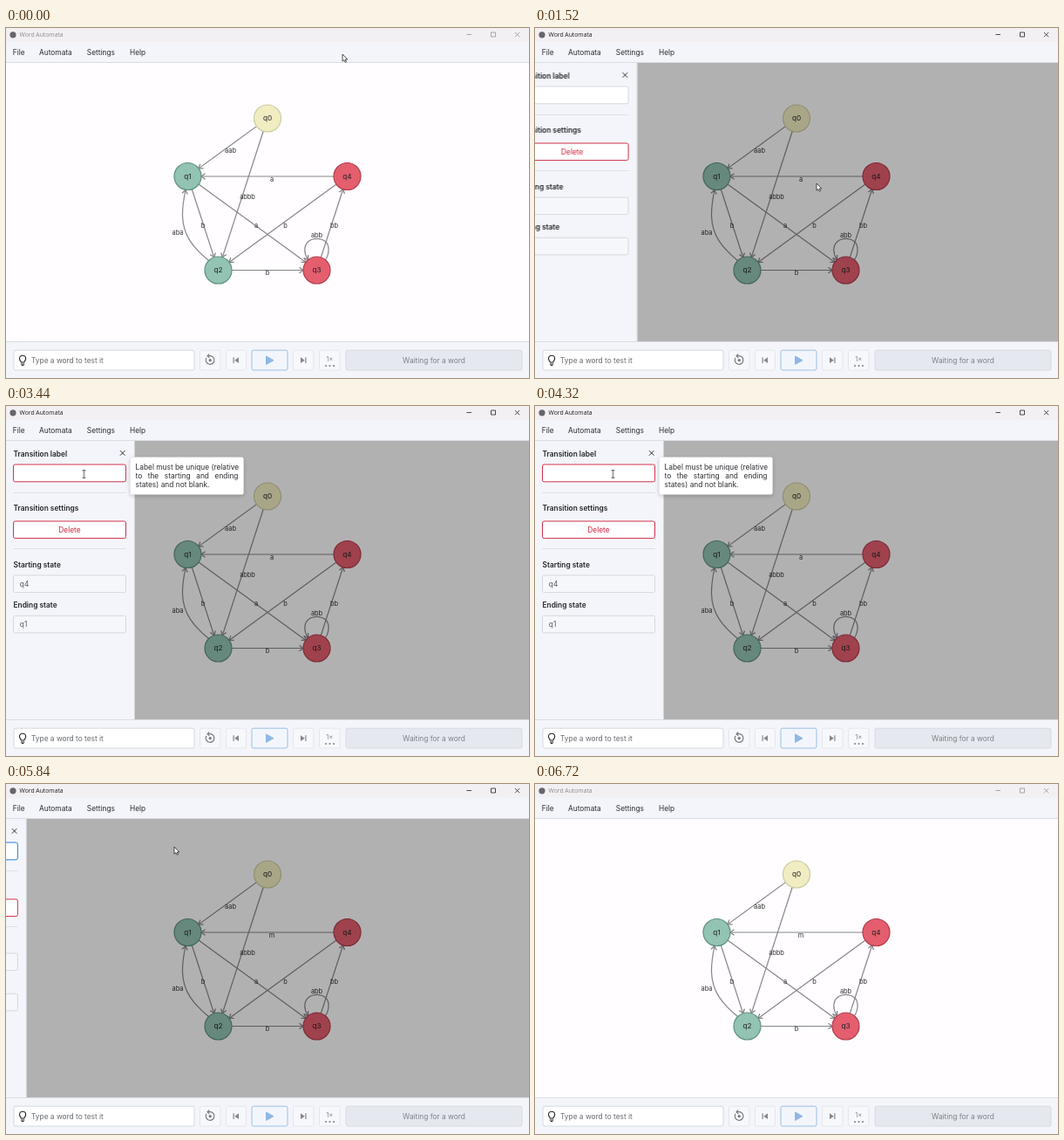
An HTML page for the animation above (6.76 s loop, 600 px wide and 401 px high).

```html
<!DOCTYPE html>
<html lang="en">
<head>
<meta charset="utf-8">
<title>Word Automata</title>
<style>
html, body { margin: 0; width: 100%; height: 100%; overflow: hidden; background: #fffdff; }
svg { display: block; width: 100vw; height: 100vh; }
text, .tip { font-family: Inter, "Open Sans", sans-serif; font-size: 8.35px; fill: #2b2d31; }
.mid { text-anchor: middle; }
.head { font-weight: 600; fill: #212529; }
.node { font-size: 8.2px; fill: #222; }
.edge { fill: none; stroke: #868588; stroke-width: 1.2; }
.label { font-size: 7.4px; fill: #333; }
.icon { fill: none; stroke-linecap: round; stroke-linejoin: round; }
.box { fill: #f6f7fa; stroke: #d3d9df; }
.btn { fill: #f7f8fb; stroke: #e3e7ec; }
.tip { box-sizing: border-box; width: 118px; line-height: 10.2px; color: #2b2d31; white-space: nowrap; }
.tip div { text-align: justify; text-align-last: justify; }
.tip div:last-child { text-align-last: left; }

.anim { animation: 6.76s linear infinite; }
.step { animation: 6.76s step-end infinite; }
#title { animation-name: title; }
#controls { animation-name: controls; }
#menu { animation-name: menu; }
#hover { animation-name: hover; }
#shade { animation-name: shade; }
#drawer { animation-name: drawer; }
#field { animation-name: field; }
.before { animation-name: before; }
.after { animation-name: after; }
#caret { animation-name: caret; }
#tooltip { animation-name: tooltip; }
#pointer { animation-name: pointer; }
#arrow { animation-name: arrow; }
#beam { animation-name: beam; }

@keyframes title { 0%, 99.3% { fill: #8c8a8c; } 11.24% { fill: #1e1e1e; } }
@keyframes controls { 0%, 99.3% { stroke: #949294; } 11.24% { stroke: #222; } }
@keyframes menu { 0%, 11.24% { opacity: 0; } 13%, 20.7% { opacity: 1; } 21.2%, 100% { opacity: 0; } }
@keyframes hover { 0% { opacity: 0; } 14.5% { opacity: 1; } 21.3% { opacity: 0; } }
@keyframes shade { 0% { opacity: 0; } 20.68% { opacity: .3; } 87.5% { opacity: 0; } }
@keyframes drawer {
  0% { transform: translateX(-148px); }
  20.68% { transform: translateX(-148px); animation-timing-function: ease; }
  24.38% { transform: none; }
  84.41% { transform: none; animation-timing-function: ease; }
  88.11%, 100% { transform: translateX(-148px); }
}
@keyframes field {
  0% { stroke: #d3d9df; }
  36.1% { stroke: #2b7fd4; }
  41.57% { stroke: #d3324c; }
  66.8% { stroke: #2b7fd4; }
  88.2% { stroke: #d3d9df; }
}
@keyframes before { 0% { opacity: 1; } 41.57% { opacity: 0; } }
@keyframes after { 0% { opacity: 0; } 66.8% { opacity: 1; } }
@keyframes caret {
  0% { opacity: 0; transform: translateX(4.8px); }
  36.1% { opacity: 1; transform: translateX(4.8px); }
  41.57% { opacity: 1; transform: none; }
  48.96% { opacity: 0; transform: none; }
  56.36% { opacity: 1; transform: none; }
  63.76% { opacity: 0; transform: none; }
  66.8% { opacity: 1; transform: translateX(7.5px); }
  74.2% { opacity: 0; transform: translateX(7.5px); }
  81.6% { opacity: 1; transform: translateX(7.5px); }
  84.4% { opacity: 0; transform: none; }
}
@keyframes tooltip { 0%, 41.57% { opacity: 0; } 43.8%, 66.8% { opacity: 1; } 68.6%, 100% { opacity: 0; } }
@keyframes pointer {
  0%, .59% { transform: translate(386px, 30px); animation-timing-function: ease-in-out; }
  10.36%, 13.3% { transform: translate(313px, 170px); }
  17.75% { transform: translate(319px, 174.5px); }
  20.7% { transform: translate(323px, 178px); }
  30.77% { transform: translate(323px, 178px); animation-timing-function: ease-in-out; }
  36.09% { transform: translate(89.5px, 78px); }
  78.1% { transform: translate(89.5px, 78px); animation-timing-function: ease-in-out; }
  83.43% { transform: translate(193px, 72px); }
  88.76% { transform: translate(193px, 72px); animation-timing-function: ease-in; }
  94.08%, 100% { transform: translate(350px, -14px); }
}
@keyframes arrow { 0% { opacity: 1; } 34.8% { opacity: 0; } 80.6% { opacity: 1; } }
@keyframes beam { 0% { opacity: 0; } 34.8% { opacity: 1; } 80.6% { opacity: 0; } }
</style>
</head>
<body>
<svg viewBox="0 0 600 401" preserveAspectRatio="none">
  <defs>
    <marker id="tipMark" markerUnits="userSpaceOnUse" markerWidth="12" markerHeight="12" viewBox="-6 -6 12 12" orient="auto">
      <path d="M-4.5 -3.2L0 0L-4.5 3.2" fill="none" stroke="#868588" stroke-width="1.3"/>
    </marker>
    <filter id="soft" x="-20%" y="-20%" width="140%" height="150%">
      <feDropShadow dx="0" dy="1.5" stdDeviation="2" flood-color="#000" flood-opacity=".2"/>
    </filter>
  </defs>

  <rect width="600" height="401" fill="#fffdff"/>
  <g id="graph"></g>
  <rect id="shade" class="step" y="40" width="600" height="320" fill="#000"/>

  <!-- transition drawer -->
  <g id="drawer" class="anim">
    <rect y="40" width="147.5" height="320" fill="#f4f5fa"/>
    <text class="head" x="8.5" y="57.7">Transition label</text>
    <path class="icon" d="M131.2 51.4l5 5m0-5l-5 5" stroke="#333"/>
    <rect id="field" class="step" x="8.5" y="67" width="129" height="19.8" rx="2" fill="#fff"/>
    <text class="step before" x="15.8" y="79.7">a</text>
    <text class="step after" x="15.8" y="79.7">m</text>
    <rect id="caret" class="step" x="15.8" y="72" width=".8" height="10" fill="#222"/>
    <path d="M8.5 99.5h129M8.5 163.5h129" stroke="#dbe0e6"/>
    <text class="head" x="8.5" y="120">Transition settings</text>
    <rect x="8.5" y="132" width="129" height="19.6" rx="2" fill="#fff" stroke="#cf304b"/>
    <text class="mid" x="73" y="144.8" style="fill:#cf2440">Delete</text>
    <text class="head" x="8.5" y="184.9">Starting state</text>
    <rect class="box" x="8.5" y="194" width="129" height="19.6" rx="2"/>
    <text x="15.8" y="206.8" style="fill:#54585d">q4</text>
    <text class="head" x="8.5" y="231.3">Ending state</text>
    <rect class="box" x="8.5" y="240.3" width="129" height="19.6" rx="2"/>
    <text x="15.8" y="253.1" style="fill:#54585d">q1</text>
  </g>

  <g id="tooltip" class="anim">
    <rect x="142.5" y="58.8" width="130" height="42.4" rx="2" fill="#fff" stroke="#dfe3e8" stroke-width=".6" filter="url(#soft)"/>
    <foreignObject x="148.5" y="64.8" width="122" height="34">
      <div class="tip" xmlns="http://www.w3.org/1999/xhtml"><div>Label must be unique (relative</div><div>to the starting and ending</div><div>states) and not blank.</div></div>
    </foreignObject>
  </g>

  <!-- window bars -->
  <rect width="600" height="16" fill="#f3f0f3"/>
  <rect y="16" width="600" height="23.5" fill="#f4f5fa"/>
  <path d="M0 39.5h600" stroke="#d9dee4"/>
  <circle cx="8" cy="7.8" r="3.6" fill="#66656a"/>
  <text id="title" class="step" x="15.5" y="10.3" style="font-family:'Open Sans','Noto Sans',sans-serif;font-size:6.8px">Word Automata</text>
  <path id="controls" class="step" d="M528.5 7.5h5.5M556.5 5h5v5h-5zM584 5l5.2 5.2m0-5.2l-5.2 5.2" fill="none" stroke-width=".8"/>
  <text x="7.8" y="31.2">File</text>
  <text x="38" y="31.2">Automata</text>
  <text x="92.8" y="31.2">Settings</text>
  <text x="142" y="31.2">Help</text>

  <!-- test bar -->
  <rect y="359.5" width="600" height="42" fill="#f4f5fa"/>
  <path d="M0 359.5h600" stroke="#d9dee4"/>
  <rect x="9" y="369.2" width="207" height="22.8" rx="2" fill="#fff" stroke="#d3d9df"/>
  <path class="icon" d="M17.3 383c0-1.5-1.8-2-1.8-4.2a3.6 3.6 0 0 1 7.2 0c0 2.200-1.800 2.700-1.800 4.200zM17.300 385h3.600M18.200 386.500h1.800" stroke="#222" stroke-width="1.100"/>
  <text x="29" y="383.700" style="fill:#65696e">Type a word to test it</text>
  <rect class="btn" x="222.500" y="369.200" width="23.500" height="22.800" rx="2"/>
  <g class="icon" stroke="#77797d" stroke-width="1.200">
    <path d="M229.800 378.300a4.800 4.800 0 1 0 4.400-2.600h-3.200m1.900-1.900l-1.900 1.900l1.900 1.900"/>
    <circle cx="234.200" cy="380.700" r="1" fill="#77797d"/>
  </g>
  <rect class="btn" x="252.500" y="369.200" width="23" height="22.800" rx="2"/>
  <path d="M260.500 377.300h1.200v6.800h-1.200zM267 377.300v6.800l-4.800-3.400z" fill="#85878b"/>
  <rect x="282" y="369.200" width="41" height="22.800" rx="2" fill="#f2f6fc" stroke="#9bbfe6"/>
  <path d="M298.500 376l8.500 4.700l-8.500 4.700z" fill="#8fb8e6" stroke="#8fb8e6" stroke-linejoin="round"/>
  <rect class="btn" x="329.500" y="369.200" width="23.500" height="22.800" rx="2"/>
  <path d="M338 377.300v6.800l4.800-3.400zM343.300 377.300h1.200v6.800h-1.200z" fill="#85878b"/>
  <rect class="btn" x="359.500" y="369.200" width="23.500" height="22.800" rx="2"/>
  <text class="mid" x="371.300" y="381.700" style="font-size:7.600px;fill:#85878b">1×</text>
  <path d="M367 387h0M371.500 387h0M376 387h0" stroke="#85878b" stroke-width="2.200" stroke-linecap="round"/>
  <rect x="390" y="369.200" width="202" height="22.800" rx="2" fill="#e5e9ef" stroke="#d6dbe2"/>
  <text class="mid" x="491" y="383.700" style="fill:#7b8188">Waiting for a word</text>

  <!-- context menu -->
  <g id="menu" class="anim">
    <rect x="313" y="170" width="69.500" height="52" rx="2" fill="#fff" stroke="#dee2e8" stroke-width=".7" filter="url(#soft)"/>
    <rect id="hover" class="step" x="315.500" y="172.500" width="64.500" height="20.500" rx="2" fill="#ededf1"/>
    <path d="M317 195.300h62" stroke="#dfe3e8" stroke-width=".8"/>
    <g class="icon" stroke="#2b2d31">
      <circle cx="327.700" cy="182.600" r="4.300"/>
      <path d="M327.700 182.400v2.200M327.700 180.500h0"/>
    </g>
    <text x="337" y="185.600">Details</text>
    <path class="icon" d="M323.700 206h8M326 206v-1.600h3.400v1.600M324.600 206.200l.5 6.500h5.200l.5-6.500M326.800 208v3M328.700 208v3" stroke="#cf2440"/>
    <text x="337" y="211.600" style="fill:#cf2440">Delete</text>
  </g>

  <g id="pointer" class="anim">
    <path id="arrow" class="step" d="M0 0v8.200l1.900-1.700l1.300 2.700l1.300-.6l-1.200-2.600h2.500z" fill="#fff" stroke="#222" stroke-width=".8" stroke-linejoin="round"/>
    <g id="beam" class="step">
      <path d="M-1.700 -4.300h3.400M0 -4.300v8.600M-1.700 4.300h3.400" fill="none" stroke="#333" stroke-width=".9"/>
    </g>
  </g>
</svg>
<script>
const R = 15.5;
const red = ["#e45e6e", "#b23e4d"], green = ["#92c3b3", "#5f917f"], cream = ["#f1edc3", "#cfcba2"];
const nodes = {
  q0: [300, 103.5, cream],
  q1: [208.5, 170, green],
  q2: [243.5, 277.5, green],
  q3: [356.5, 277.5, red],
  q4: [391.5, 170, red]
};
const edges = [
  ["q0", "q1", "aab", 257.5, 140.5],
  ["q0", "q2", "abbb", 277, 194],
  ["q1", "q2", "b", 226, 227],
  ["q1", "q3", "a", 287, 227],
  ["q4", "q2", "b", 320.5, 227],
  ["q3", "q4", "bb", 376.5, 227],
  ["q2", "q3", "b", 300, 281],
  ["q4", "q1", "", 0, 0]
];

const edge = d => `<path class="edge" d="${d}" marker-end="url(#tipMark)"/>`;
const label = (s, x, y, cls = "") => `<text class="mid label ${cls}" x="${x}" y="${y + 2.4}">${s}</text>`;

function straight(from, to) {
  const [x1, y1] = nodes[from], [x2, y2] = nodes[to];
  const len = Math.hypot(x2 - x1, y2 - y1);
  const dx = (x2 - x1) / len * R, dy = (y2 - y1) / len * R;
  return edge(`M${x1 + dx} ${y1 + dy}L${x2 - dx} ${y2 - dy}`);
}

let lines = "", labels = "", discs = "";
for (const [from, to, s, x, y] of edges) {
  lines += straight(from, to);
  labels += label(s, x, y);
}
lines += edge("M232.5 266.5C215 252 203 238 202.5 215C202.300 205 204 195 206 185.500");
lines += edge("M366.500 265.500C371 259 371.500 249 366.500 244.800C361 240.300 352 240.300 346.800 244.800C341.500 249.500 341.500 258 346.500 265.500");
labels += label("aba", 197, 235) + label("abb", 356.5, 238);
labels += label("a", 305, 174, "step graphA") + label("m", 305, 174, "step after");

for (const [name, [x, y, [fill, line]]] of Object.entries(nodes)) {
  discs += `<circle cx="${x}" cy="${y}" r="${R}" fill="${fill}" stroke="${line}" stroke-width="1.2"/>`
    + `<text class="mid node" x="${x}" y="${y + 2.7}">${name}</text>`;
}
document.getElementById("graph").innerHTML = lines + discs + labels;
</script>
<style>
.graphA { animation-name: graphA; }
@keyframes graphA { 0% { opacity: 1; } 66.8% { opacity: 0; } }
</style>
</body>
</html>
```
